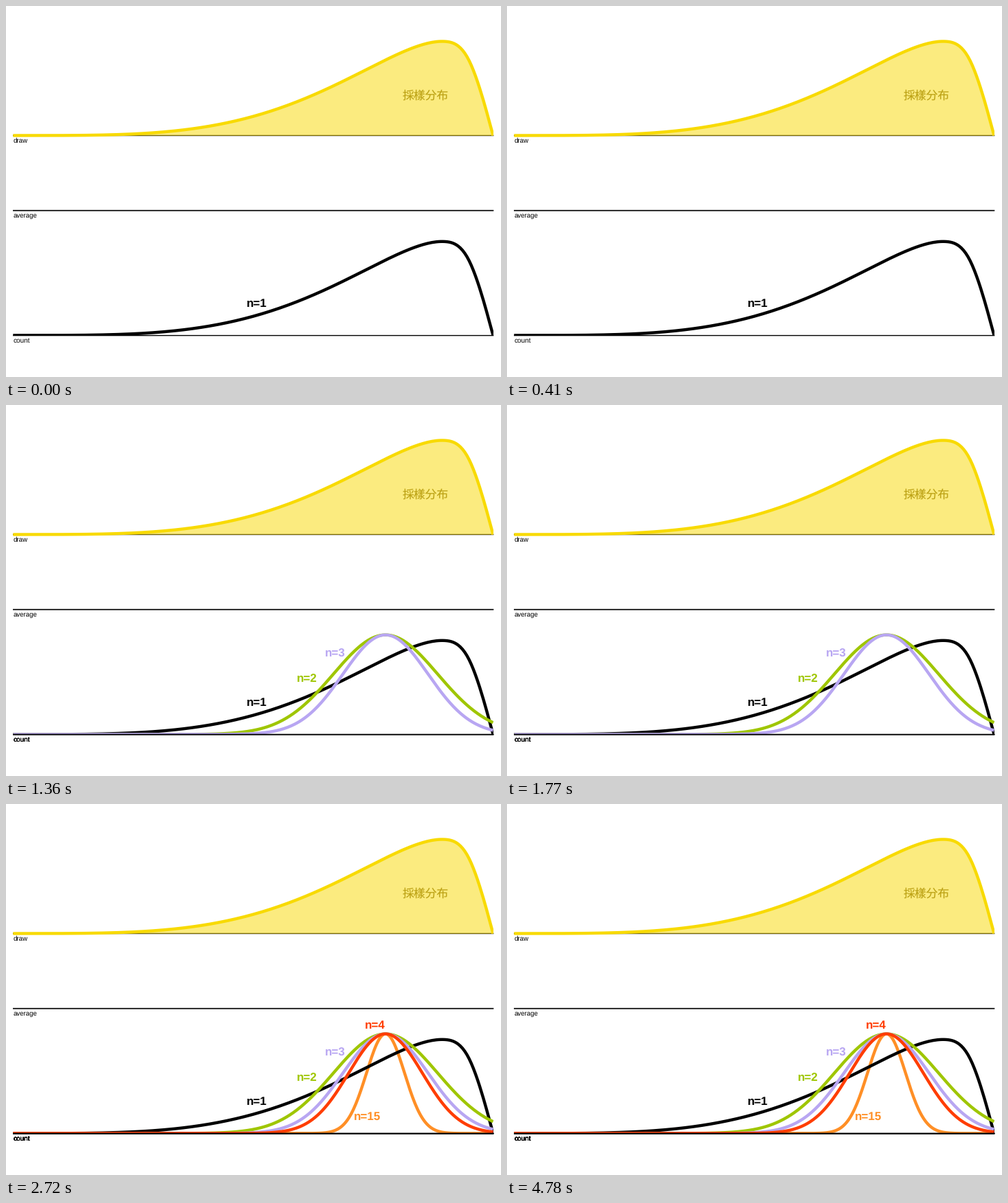
Write a matplotlib script that moves like this. It is 720x540 px and loops after 6.16 s.

```python
import numpy as np
import matplotlib.pyplot as plt
from matplotlib.animation import FuncAnimation
from matplotlib.patches import Rectangle

plt.rcParams["text.hinting"] = "none"
plt.rcParams["font.family"] = "Liberation Sans"

W, H = 720, 540
INTERVAL, FRAMES, STEP = 40, 154, 17
LEFT, RIGHT = 10.3, 708.5
DRAW_Y, MEAN_Y, COUNT_Y = 188.5, 297.7, 479.4
A, B = 4.95, 1.43

fig = plt.figure(figsize=(W / 72, H / 72), dpi=72, facecolor="white")
ax = fig.add_axes([0, 0, 1, 1])
ax.set(xlim=(0, W), ylim=(H, 0))
ax.axis("off")


def b_spline(points, samples=12):
    """Uniform cubic B-spline clamped at both ends."""
    p = np.vstack([points[:1], points[:1], points, points[-1:], points[-1:]])
    t = np.linspace(0, 1, samples)[:, None]
    weights = ((1 - t) ** 3, 3 * t**3 - 6 * t**2 + 4,
               -3 * t**3 + 3 * t**2 + 3 * t + 1, t**3)
    pieces = [sum(w * q for w, q in zip(weights, p[i:i + 4])) / 6
              for i in range(len(p) - 3)]
    return np.vstack(pieces).T


def to_x(u):
    return LEFT + (RIGHT - LEFT) * u


def beta_curve():
    u = np.linspace(0, 1, 21)
    x, density = b_spline(np.column_stack([u, u ** (A - 1) * (1 - u) ** (B - 1)]))
    return to_x(x), density / density.max()


def normal_curve(n):
    u = np.linspace(0, 1, 400)
    mean = A / (A + B)
    var = A * B / ((A + B) ** 2 * (A + B + 1) * n)
    return to_x(u), np.exp(-((u - mean) ** 2) / (2 * var))


def axis_line(y, width, z):
    return ax.plot([10, 709.3], [y, y], color="black", lw=width, zorder=z,
                   solid_capstyle="butt", snap=False)[0]


def label(x, y, text, size, z=50, **style):
    return ax.text(x, y, text, size=size, va="baseline", zorder=z, **style)


def clip_box(bottom):
    return Rectangle((10, 0), 699, bottom, transform=ax.transData)


def curve(x, y, color, z, bottom):
    line, = ax.plot(x, y, color=color, lw=4.4, zorder=z, snap=False,
                    solid_capstyle="butt", solid_joinstyle="round")
    line.set_clip_path(clip_box(bottom))
    return line


# Sampling distribution
x, shape = beta_curve()
axis_line(DRAW_Y, 1.4, 1)
ax.fill_between(x, DRAW_Y, DRAW_Y - 137 * shape, color="#f8d800",
                alpha=0.5, lw=0, zorder=2)
curve(x, DRAW_Y - 137 * shape, "#f8da00", 3, 192)
label(577, 135.4, "採樣分布", 16.8, color="#bfa519", family="Noto Sans CJK JP")
label(10.6, 199, "draw", 9.8)

axis_line(MEAN_Y, 1.7, 1)
label(10.6, 307.8, "average", 9.6)

# Distribution of the mean: n, colour, label position, stacking order
SERIES = [
    (1, "#000000", 350, 438.2, 5),
    (2, "#9fc600", 422.7, 403.3, 6),
    (3, "#b8a6f2", 463.8, 367.3, 7),
    (4, "#ff3d00", 521.8, 327.2, 8),
    (15, "#ff8f26", 505.8, 459.4, 4),
]


def build_layer(n, color, lx, ly, z):
    px, h = beta_curve() if n == 1 else normal_curve(n)
    height = 136.6 if n == 1 else 144.8
    return [
        curve(px, COUNT_Y - height * h, color, z, 480.3),
        axis_line(COUNT_Y + 0.2, 1.4, 20),
        label(10.6, 489.6, "count", 10),
        label(lx, ly, f"n={n}", 17, color=color, weight="bold"),
    ]


layers = [build_layer(*row) for row in SERIES]


def update(frame):
    shown = min(frame // STEP, len(layers) - 1)
    for i, layer in enumerate(layers):
        for artist in layer:
            artist.set_visible(i <= shown)
    return [artist for layer in layers for artist in layer]


anim = FuncAnimation(fig, update, frames=FRAMES, interval=INTERVAL,
                     init_func=lambda: update(0), repeat=True, repeat_delay=0)
plt.show()
```
